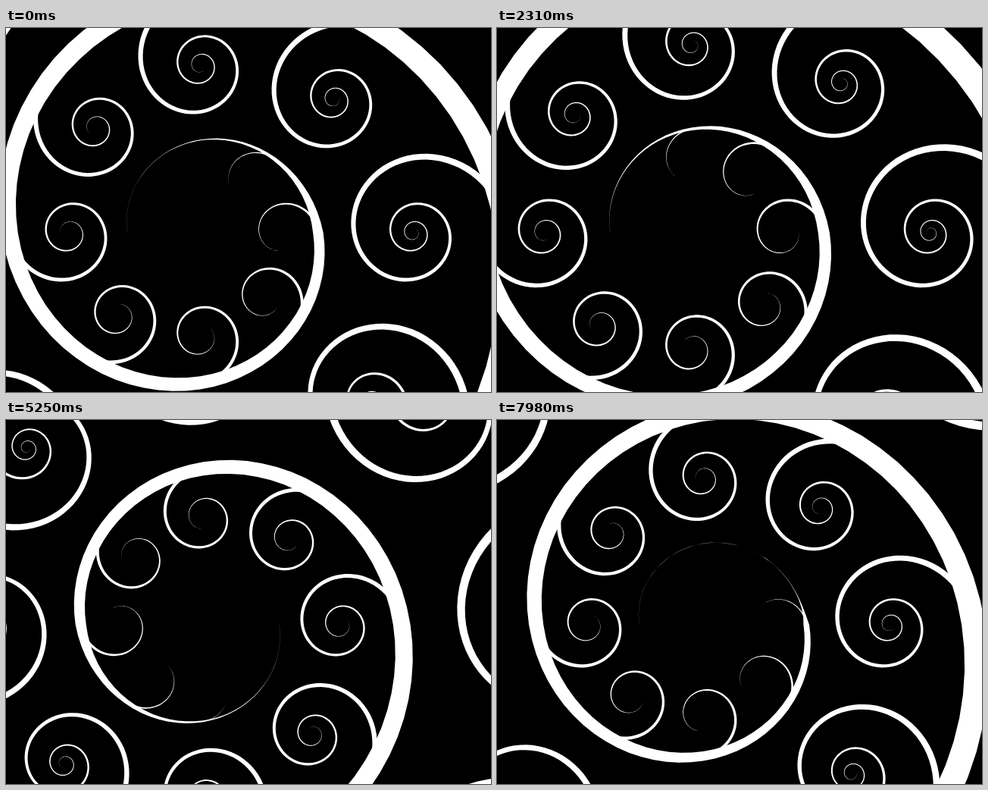
An HTML page with a canvas that plays this animation: 640 by 480 pixels, repeating every 8 s.

```html
<!DOCTYPE html>
<html lang="en">
<head>
<meta charset="utf-8">
<title>Endless spiral</title>
<style>
  html, body { margin: 0; width: 100%; height: 100%; overflow: hidden; background: #000; }
  canvas { display: block; width: 640px; height: 480px; }
</style>
</head>
<body>
<canvas id="stage" width="640" height="480"></canvas>
<script>
const ctx = document.getElementById('stage').getContext('2d');
const LOOP = 8000, STEP = 70;
const PHI = (1 + Math.sqrt(5)) / 2;   // growth per half turn
const RATE = 0.968;                   // half turns of zoom per second
const BASE_RADIUS = 155.5;
const CHILD = 0.31;                   // child size relative to its root radius
const STROKE = 0.086, CHILD_STROKE = 0.078;

const clamp = v => Math.min(1, Math.max(0, v));
const mix = (a, b, k) => a + (b - a) * k;

// Logarithmic ribbon from p0 inward to p1, in half turns; angle is -PI * p.
function ribbon(cx, cy, radiusAt, widthAt, p0, p1) {
  const count = Math.max(2, Math.ceil((p1 - p0) * 36));
  const outline = side => {
    const points = [];
    for (let i = 0; i <= count; i++) {
      const p = mix(p0, p1, i / count);
      const r = radiusAt(p) * (1 + side * widthAt(p) / 2);
      points.push([cx + r * Math.cos(Math.PI * p), cy - r * Math.sin(Math.PI * p)]);
    }
    return points;
  };
  ctx.beginPath();
  for (const [x, y] of outline(1).concat(outline(-1).reverse())) ctx.lineTo(x, y);
  ctx.fill();
}

// Relative thickness at the joint between two half turns.
function jointWidth(age) {
  const k = clamp((age + 0.25) / 0.55);
  return 0.001 + STROKE * k * k * (3 - 2 * k);
}

function draw(seconds) {
  const zoom = seconds * RATE;
  const cx = 256 + 0.39 * PHI ** zoom, cy = 270;
  const front = zoom + 0.35;
  const tip = Math.floor(front) + 1;
  const outer = Math.floor(zoom) - 5;
  const radius = p => BASE_RADIUS * PHI ** (zoom - p);

  const stemWidth = p => {
    const joint = Math.min(Math.floor(p), tip - 1);
    const age = front - joint;
    const power = 0.85 * Math.min(1, Math.max(0.02, age)) ** -1.3;
    return mix(jointWidth(age - 1), jointWidth(age), clamp(joint + 1 - p) ** power);
  };

  ctx.fillStyle = '#000';
  ctx.fillRect(0, 0, 640, 480);
  ctx.fillStyle = '#fff';
  ribbon(cx, cy, radius, stemWidth, outer, tip);

  for (let root = outer; root <= tip; root += 0.25) {
    const r = radius(root);
    const length = Math.min(8, 1 + 5.4 * Math.log(r / 143));
    if (length <= 0) continue;
    const reach = r * (1 - CHILD);
    ribbon(
      cx + reach * Math.cos(Math.PI * root),
      cy - reach * Math.sin(Math.PI * root),
      p => CHILD * radius(p),
      p => CHILD_STROKE * clamp((root + length - p) / 1.5),
      root, root + length
    );
  }
}

const start = performance.now();
function tick() {
  const time = (performance.now() - start) % LOOP;
  draw(Math.floor(time / STEP) * STEP / 1000);
  requestAnimationFrame(tick);
}
tick();
</script>
</body>
</html>
```
